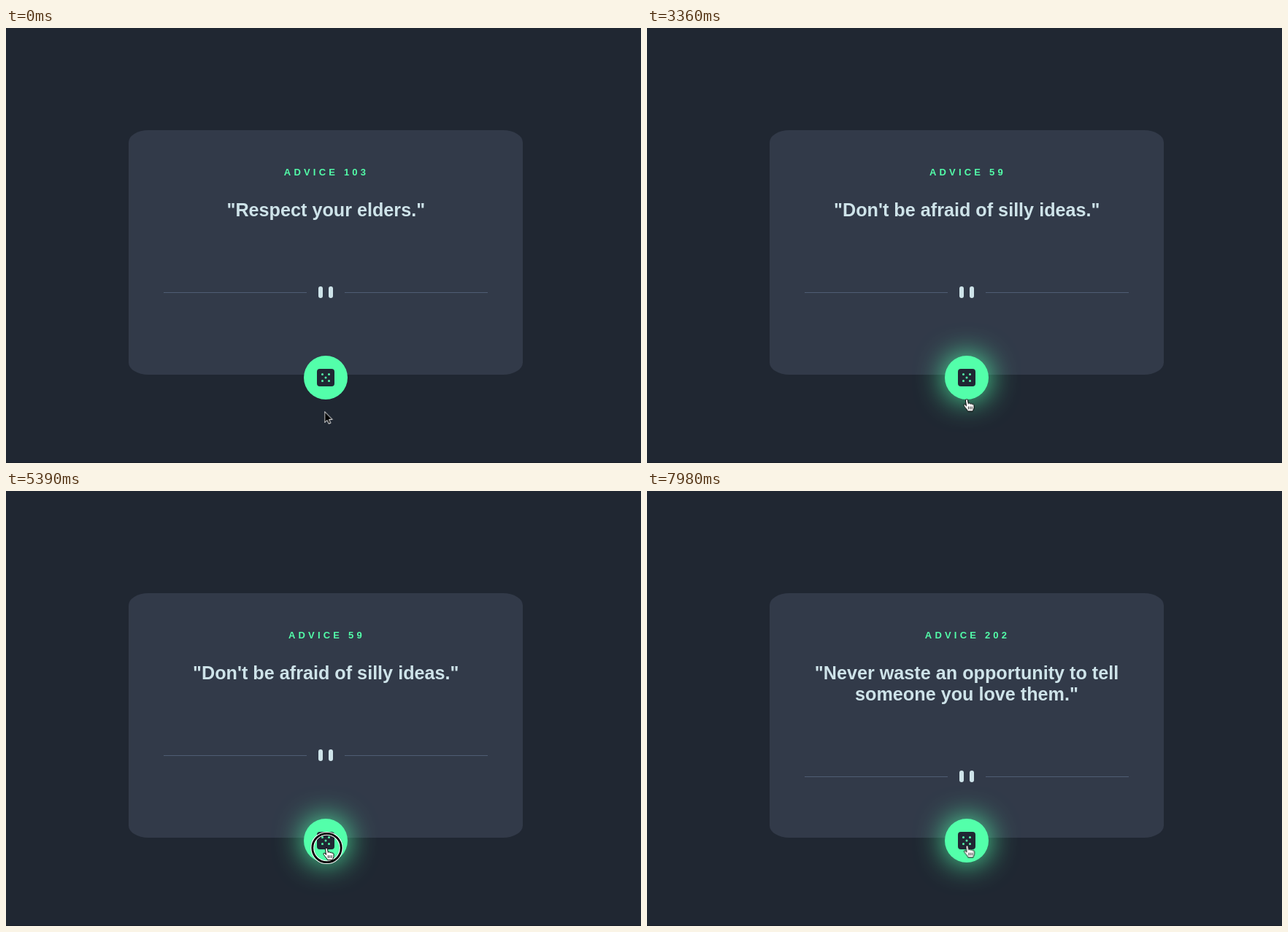
Write an HTML page that moves like this. It is 870 by 596 pixels and loops after 8000 ms.

```html
<!DOCTYPE html>
<html lang="en">
<head>
<meta charset="utf-8">
<title>Advice generator</title>
<style>
  html, body { margin: 0; width: 100%; height: 100%; overflow: hidden; background: #202732; }
  .stage { position: relative; width: 870px; height: 596px; overflow: hidden; }
  .stage::after { content: ""; position: absolute; left: 0; right: 0; bottom: 0; height: 1px; background: #1a202a; }
  .card { position: absolute; left: 168px; top: 140px; width: 540px; height: 335px; border-radius: 5%; background: #323a49; }
  svg { position: absolute; left: 0; top: 0; }
  text { font-family: "Liberation Sans", Helvetica, Arial, sans-serif; font-weight: 700; }
  .label { font-size: 13px; letter-spacing: 4.2px; fill: #53ffaa; }
  .quote { font-size: 25.2px; text-anchor: middle; fill: #cee3e9; }
  .button { position: absolute; left: 408px; top: 449px; width: 60px; height: 60px; border-radius: 50%; background: #53ffaa; }

  /* all motion runs on a 70 ms beat within 8 s */
  .first, .second, .third, .divider, .button, .cursor, .arrow, .hand, .ring {
    animation: 8s step-end -4ms infinite;
  }
  .first { animation-name: first; }
  .second { animation-name: second; }
  .third { animation-name: third; }
  .divider { animation-name: drop; }
  .button { animation-name: glow; }
  .cursor { animation-name: move; }
  .arrow { animation-name: arrow; }
  .hand { animation-name: hand; }
  .ring { animation-name: click; }

  @keyframes first { 0% { opacity: 1; } 37.625%, 100% { opacity: 0; } }
  @keyframes second { 0% { opacity: 0; } 37.625% { opacity: 1; } 74.375%, 100% { opacity: 0; } }
  @keyframes third { 0% { opacity: 0; } 74.375%, 100% { opacity: 1; } }
  @keyframes drop { 0% { transform: none; } 74.375%, 100% { transform: translateY(29px); } }

  @keyframes glow {
    0%, 42.875% { box-shadow: none; }
    20.125%, 52.5%, 100% { box-shadow: 0 0 40px #53ffaa; }
  }
  @keyframes arrow { 0%, 42.875% { opacity: 1; } 20.125%, 52.5%, 100% { opacity: 0; } }
  @keyframes hand { 0%, 42.875% { opacity: 0; } 20.125%, 52.5%, 100% { opacity: 1; } }

  @keyframes move {
    0% { transform: translate(436.5px, 525px); animation-timing-function: steps(4); }
    3.5% { transform: translate(436.5px, 495px); }
    19.25% { transform: translate(436.5px, 495px); animation-timing-function: steps(7); }
    25.375% { transform: translate(439px, 488.5px); }
    36.75% { transform: translate(439px, 488.5px); animation-timing-function: steps(6); }
    42% { transform: translate(438px, 508.5px); animation-timing-function: steps(6); }
    47.25% { transform: translate(437px, 529px); }
    49% { transform: translate(437px, 529px); animation-timing-function: steps(7); }
    55.125% { transform: translate(439px, 490.5px); animation-timing-function: steps(3); }
    57.75% { transform: translate(439px, 489px); }
    74.375% { transform: translate(435.5px, 478px); }
    77.875% { transform: translate(436px, 477px); }
    79.625% { transform: translate(438px, 490px); }
    81.375% { transform: translate(438px, 480px); }
    82.25% { transform: translate(438px, 473px); }
    83.125%, 100% { transform: translate(438.5px, 485.5px); }
  }
  @keyframes click {
    0%, 13.125%, 30.625%, 69.125%, 89.25%, 91.875%, 99.75%, 100% { opacity: 0; }
    11.375%, 28.875%, 67.375%, 88.375%, 91%, 98% { opacity: 1; }
    12.25%, 29.75%, 68.25%, 98.875% { opacity: .6; }
  }
</style>
</head>
<body>
<div class="stage">
  <div class="card"></div>

  <svg width="870" height="596">
    <g class="first">
      <text class="label" x="380.8" y="202">ADVICE 103</text>
      <text class="quote" x="438.3" y="258">"Respect your elders."</text>
    </g>
    <g class="second">
      <text class="label" x="386.9" y="202">ADVICE 59</text>
      <text class="quote" x="438.3" y="258">"Don't be afraid of silly ideas."</text>
    </g>
    <g class="third">
      <text class="label" x="380.8" y="202">ADVICE 202</text>
      <text class="quote" x="438" y="258">"Never waste an opportunity to tell</text>
      <text class="quote" x="438" y="287">someone you love them."</text>
    </g>
    <g class="divider">
      <path d="M216 362h196v1h-196zM464 362h196v1h-196z" fill="#4f5d74"/>
      <g fill="#cee3e9">
        <rect x="428" y="354" width="6" height="16" rx="3"/>
        <rect x="442" y="354" width="6" height="16" rx="3"/>
      </g>
    </g>
  </svg>

  <div class="button"></div>

  <svg width="870" height="596">
    <rect x="426" y="467" width="24" height="24" rx="4" fill="#202733"/>
    <g fill="#53ffaa">
      <circle cx="433.5" cy="474.5" r="1.5"/>
      <circle cx="442.5" cy="474.5" r="1.5"/>
      <circle cx="438" cy="479" r="1.5"/>
      <circle cx="433.5" cy="483.5" r="1.5"/>
      <circle cx="442.5" cy="483.5" r="1.5"/>
    </g>
    <g class="cursor">
      <g class="ring" fill="none">
        <circle cx=".5" r="19.7" stroke="#fff" stroke-width="4.8"/>
        <circle cx=".5" r="19.7" stroke="#000" stroke-width="2.8"/>
      </g>
      <path class="arrow" d="M0 .5V15.6L3.5 12.3L5.8 17.3L8.3 16.2L6.1 11.3H10.6Z" fill="#000" stroke="#fff" stroke-linejoin="round"/>
      <g class="hand" stroke="#000" stroke-linejoin="round" stroke-linecap="round">
        <path fill="#fff" d="M-1.5 1.5a1.5 1.5 0 0 1 3 0l.8 4.8c.3-1.2 2.6-1 2.8.4c.5-1 2.5-.6 2.7.7c.6-.8 2.2-.3 2.2 1.2v3c0 2-1.4 3-1.6 5h-7c-.4-2-2-3-3.5-5.2c-.8-1.2-2-2.6-2-3.4c.2-1.4 2-1 3 .2l.4.8z"/>
        <path fill="none" stroke-width=".9" d="M2.4 10.5v3M4.8 10.5v3M7.2 10.5v3"/>
      </g>
    </g>
  </svg>
</div>
</body>
</html>
```
